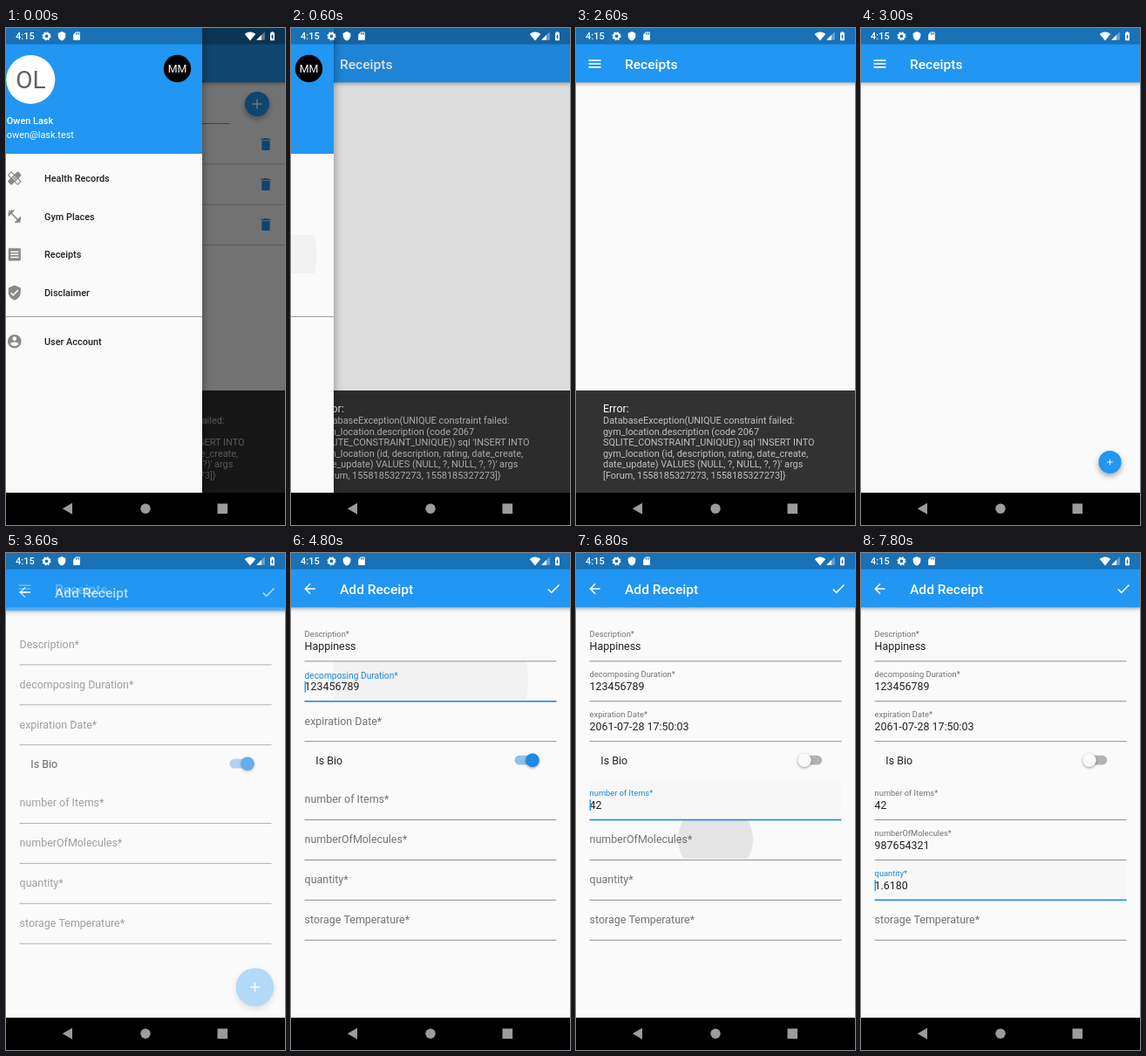
Animation, 320 px wide and 569 px high, one loop 8000 ms. Source, as an HTML page with a canvas:

```html
<!DOCTYPE html>
<html lang="en">
<head>
<meta charset="utf-8">
<title>Receipt form</title>
<style>
html, body { margin: 0; width: 100%; height: 100%; overflow: hidden; background: #000; }
canvas { display: block; width: 320px; height: 569px; }
</style>
</head>
<body>
<canvas id="stage"></canvas>
<script>
const W = 320, H = 569, LOOP = 8000, STEP = 200;
const BLUE = '#2196f3', PAPER = '#fafafa', INK = 'rgba(0,0,0,.87)', HINT = 'rgba(0,0,0,.54)';
const BODY = 12.45, SMALL = 10.9, DRAWER = 225;

const SHIELD = 'M12 1L3 5v6c0 5.55 3.84 10.74 9 12 5.16-1.26 9-6.45 9-12V5z';
const DOT = 'a1 1 0 0 1 0 2 1 1 0 0 1 0-2z';
const ICONS = {
  menu: 'M3 18h18v-2H3zM3 13h18v-2H3zM3 6v2h18V6z',
  back: 'M20 11H7.83l5.59-5.59L12 4l-8 8 8 8 1.41-1.41L7.83 13H20z',
  check: 'M9 16.17L4.83 12l-1.42 1.41L9 19 21 7l-1.41-1.41z',
  add: 'M19 13h-6v6h-2v-6H5v-2h6V5h2v6h6z',
  bin: 'M6 19c0 1.1.9 2 2 2h8c1.1 0 2-.9 2-2V7H6zM19 4h-3.5l-1-1h-5l-1 1H5v2h14z',
  healing: 'M17.73 12.02l3.98-3.98v-1.41l-4.34-4.34h-1.41l-3.98 3.98L8 2.29H6.6L2.25 6.63v1.41l3.98 3.98L2.25 16v1.41l4.34 4.34H8l3.98-3.98 3.98 3.98h1.42l4.34-4.34V16z' +
    'M7.29 10.96L3.66 7.34l3.63-3.63 3.62 3.62zM16.66 20.34l-3.63-3.62 3.63-3.63 3.62 3.62z' +
    'M12 9' + DOT + 'M10 11' + DOT + 'M14 11' + DOT + 'M12 13' + DOT,
  gym: 'M20.57 14.86L22 13.43 20.57 12 17 15.57 8.43 7 12 3.43 10.57 2 9.14 3.43 7.71 2 5.57 4.14 4.14 2.71 2.71 4.14l1.43 1.43L2 7.71l1.43 1.43L2 10.57 3.43 12 7 8.43 15.57 17 12 20.57 13.43 22l1.43-1.43L16.29 22l2.14-2.14 1.43 1.43 1.43-1.43-1.43-1.43L22 16.29z',
  receipt: 'M18 17H6v-2h12zM18 13H6v-2h12zM18 9H6V7h12zM3 22' + 'l1.5-1.5L'.replace('L', '') + 'l1.5 1.5' + 'l1.5-1.5l1.5 1.5'.repeat(5) +
    'V2' + 'l-1.5 1.5l-1.5-1.5'.repeat(6) + 'z',
  verified: SHIELD + 'M10 17l-4-4 1.41-1.41L10 14.17l6.59-6.59L18 9z',
  account: 'M12 2C6.48 2 2 6.48 2 12s4.48 10 10 10 10-4.48 10-10S17.52 2 12 2zm0 3c1.66 0 3 1.34 3 3s-1.34 3-3 3-3-1.34-3-3 1.34-3 3-3zm0 14.2c-2.5 0-4.71-1.28-6-3.22.03-1.99 4-3.08 6-3.08 1.99 0 5.97 1.09 6 3.08-1.29 1.94-3.5 3.22-6 3.22z',
  shield: SHIELD,
  card: 'M18 2h-8L4 8v12c0 1.1.9 2 2 2h12c1.1 0 2-.9 2-2V4c0-1.1-.9-2-2-2zM12 8h-2V4h2zM15 8h-2V4h2zM18 8h-2V4h2z',
  wifi: 'M12 3C7.3 3 3 4.9 0 7.4L12 22 24 7.4C21 4.9 16.7 3 12 3z',
  signal: 'M2 22h20V2z',
  signalPart: 'M2 22h12V10z',
  battery: 'M15.67 4H14V2h-4v2H8.33C7.6 4 7 4.6 7 5.33v15.33C7 21.4 7.6 22 8.33 22h7.33c.74 0 1.34-.6 1.34-1.33V5.33C17 4.6 16.4 4 15.67 4zM11 20v-5.5H9L13 7v5.5h2z'
};
for (const k in ICONS) ICONS[k] = new Path2D(ICONS[k]);

// y: centre of the resting label; at: time at which the field gets focus
const FIELDS = [
  { y: 100.3, label: 'Description*', value: 'Happiness', at: 4200 },
  { y: 146.2, label: 'decomposing Duration*', value: '123456789', at: 4800 },
  { y: 192.1, label: 'expiration Date*', value: '2061-07-28 17:50:03', at: 5400 },
  { y: 281.9, label: 'number of Items*', value: '42', at: 6600 },
  { y: 327.8, label: 'numberOfMolecules*', value: '987654321', at: 7000 },
  { y: 373.7, label: 'quantity*', value: '1.6180', at: 7600 },
  { y: 419.6, label: 'storage Temperature*', value: '', at: Infinity }
];
const MENU = [
  ['healing', 'Health Records', 172], ['gym', 'Gym Places', 215.8], ['receipt', 'Receipts', 259.3],
  ['verified', 'Disclaimer', 303], ['account', 'User Account', 358.7]
];
const ERROR = [
  'DatabaseException(UNIQUE constraint failed:',
  'gym_location.description (code 2067',
  "SQLITE_CONSTRAINT_UNIQUE)) sql 'INSERT INTO",
  'gym_location (id, description, rating, date_create,',
  "date_update) VALUES (NULL, ?, NULL, ?, ?)' args",
  '[Forum, 1558185327273, 1558185327273]}'
];

const dpr = window.devicePixelRatio || 1;
const stage = document.getElementById('stage'), layer = document.createElement('canvas');
const [main, sheet] = [stage, layer].map(c => {
  c.width = W * dpr;
  c.height = H * dpr;
  const ctx = c.getContext('2d');
  ctx.scale(dpr, dpr);
  return ctx;
});
let g = main;

const clamp = v => Math.max(0, Math.min(1, v));

function rect(x, y, w, h, color) {
  g.fillStyle = color;
  g.fillRect(x, y, w, h);
}
function disc(x, y, r, color) {
  g.fillStyle = color;
  g.beginPath();
  g.arc(x, y, r, 0, 7);
  g.fill();
}
function text(s, x, y, size, color, weight = 400, align = 'left') {
  g.font = `${weight} ${size}px Roboto, sans-serif`;
  g.textAlign = align;
  g.fillStyle = color;
  g.fillText(s, x, y);
}
function icon(name, x, y, color, size = 18.7) {
  g.save();
  g.translate(x - size / 2, y - size / 2);
  g.scale(size / 24, size / 24);
  g.fillStyle = color;
  g.fill(ICONS[name], 'evenodd');
  g.restore();
}
function shadow(blur, dy, alpha, draw) {
  g.save();
  g.shadowColor = `rgba(0,0,0,${alpha})`;
  g.shadowBlur = blur * dpr;
  g.shadowOffsetY = dy * dpr;
  draw();
  g.restore();
}
// age counts steps from the middle of the splash
function ripple(age, cx, cy, x, w, size = 1) {
  if (age < -1 || age > 1) return;
  g.save();
  g.beginPath();
  g.rect(x, cy - 22, w, 44);
  g.clip();
  disc(cx, cy, (112 + 51 * age - 18 * age * age) * size, `rgba(0,0,0,${0.032 * 2.8 ** -age})`);
  g.restore();
}

function page(title, nav) {
  rect(0, 0, W, 532, PAPER);
  shadow(5, 2, 0.35, () => rect(-10, -10, W + 20, 72.3, BLUE));
  icon(nav, 21.5, 41, '#fff');
  text(title, 56, 46.5, 15.56, '#fff', 500);
}
function fab(x, y, r) {
  shadow(6, 3, 0.35, () => disc(x, y, r, BLUE));
}

function gymPage() {
  page('Gym Places', 'menu');
  fab(288, 87, 14);
  icon('add', 288, 87, '#fff');
  rect(15, 109, 241, 0.9, 'rgba(0,0,0,.5)');
  for (let i = 0; i < 3; i++) {
    icon('bin', 298, 133 + 46 * i, BLUE);
    rect(0, 155.5 + 46.2 * i, W, 0.8, 'rgba(0,0,0,.25)');
  }
}

function receiptsPage(t) {
  page('Receipts', 'menu');
  const grow = clamp((t - 2880) / 200);
  if (!grow) return;
  fab(285.5, 497, 21.8 * grow);
  if (t === 3400) disc(285.5, 497, 20, 'rgba(255,255,255,.15)');
  icon('add', 285.5, 497, '#fff', 18.7 * grow);
}

function snackbar(t) {
  const y = 415 + 117 * clamp((t - 2670) / 200);
  if (y >= 532) return;
  rect(0, y, W, 117, '#323232');
  text('Error:', 31, y + 25.3, BODY, '#fff');
  ERROR.forEach((s, i) => text(s, 31, y + 38.3 + 12.5 * i, SMALL, 'rgba(255,255,255,.7)'));
}

function drawer(t) {
  const right = t < 600 ? DRAWER : t < 800 ? 49 : 0;
  if (!right) return;
  rect(0, 0, W, 532, `rgba(0,0,0,${0.54 * right / DRAWER})`);
  g.save();
  g.translate(right - DRAWER, 0);
  shadow(10, 3, 0.4, () => rect(0, 0, DRAWER, 532, PAPER));
  rect(0, 0, DRAWER, 144, BLUE);
  disc(28.3, 59, 28, '#fff');
  text('OL', 28.5, 69.2, 28, '#616161', 400, 'center');
  disc(196.5, 46.5, 15.7, '#000');
  text('MM', 196.5, 51, BODY, '#fff', 400, 'center');
  text('Owen Lask', 0.8, 110.3, SMALL, '#fff', 500);
  text('owen@lask.test', 0.8, 126, SMALL, '#fff');
  for (const [name, label, y] of MENU) {
    icon(name, 9.8, y, 'rgba(0,0,0,.45)');
    text(label, 44, y + 3.9, SMALL, INK, 500);
  }
  rect(0, 330, DRAWER, 0.9, 'rgba(0,0,0,.4)');
  ripple((t - 600) / STEP, 112.5, 259, 0, DRAWER, 0.83);
  g.restore();
}

function field(f, t, active) {
  const p = clamp((t - f.at + 144) / 200), filled = t >= f.at;
  const up = filled ? p : 0;
  ripple((t - f.at) / STEP, 160, f.y, 15.5, 289);
  text(f.label, 15.6, f.y + 4.4 - 8.5 * up, BODY * (1 - 0.25 * up), active ? '#1e88d8' : HINT);
  if (filled) text(f.value, 15.6, f.y + 11, BODY, INK);
  if (active) rect(15.6, f.y + 0.6, 1.5, 12.6, BLUE);
  const line = active ? 1.6 : 0.9;
  rect(15.5, f.y + 23.6 - line / 2, 289, line, active ? '#1e88e5' : 'rgba(0,0,0,.48)');
}

function toggle(t) {
  const off = clamp((t - 5740) / 400), y = 237.2;
  ripple((t - 6000) / STEP, 160, y, 0, W);
  text('Is Bio', 28.3, y + 4.4, BODY, INK);
  const mix = (a, b) => Math.round(a + (b - a) * off);
  g.fillStyle = `rgb(${mix(140, 178)},${mix(193, 178)},${mix(240, 178)})`;
  g.beginPath();
  g.roundRect(256.5, y - 5.4, 25.7, 10.8, 5.4);
  g.fill();
  shadow(3, 1, 0.4, () => disc(277 - 15 * off, y, 7.8, `rgb(${mix(30, 250)},${mix(136, 250)},${mix(229, 250)})`));
}

function formPage(t) {
  page('Add Receipt', 'back');
  icon('check', 301, 41, '#fff');
  const focused = FIELDS.filter(f => f.at <= t).pop();
  FIELDS.forEach(f => field(f, t, f === focused));
  toggle(t);
}

function gear(x, y) {
  g.strokeStyle = '#fff';
  for (const [r, width, dash] of [[3, 2.2, []], [4.3, 1.5, [4.3 * Math.PI / 8]]]) {
    g.lineWidth = width;
    g.setLineDash(dash);
    g.beginPath();
    g.arc(x, y, r, 0, 2 * Math.PI);
    g.stroke();
  }
  g.setLineDash([]);
}

function systemBars() {
  rect(0, 0, W, 18.6, 'rgba(0,0,0,.25)');
  text('4:15', 11, 13.2, 11, '#fff', 500);
  gear(46.5, 9.3);
  icon('shield', 64, 9.3, '#fff', 11.5);
  icon('card', 81, 9.3, '#fff', 11.5);
  icon('wifi', 280, 9.3, '#fff', 12.5);
  icon('signal', 292, 9, 'rgba(255,255,255,.35)', 11.5);
  icon('signalPart', 292, 9, '#fff', 11.5);
  icon('battery', 305.5, 9.3, '#fff', 12);

  const grey = '#9c9c9c';
  rect(0, 532, W, 37, '#000');
  g.fillStyle = grey;
  g.beginPath();
  g.moveTo(64.8, 550.3);
  g.lineTo(76, 543.8);
  g.lineTo(76, 556.8);
  g.fill();
  disc(160, 550.3, 5.7, grey);
  rect(242.5, 544.5, 11.6, 11.6, grey);
}

function draw(now) {
  const t = Math.floor(now % LOOP / STEP) * STEP;
  g = main;
  if (t < 3800) {
    if (t < 600) gymPage();
    else receiptsPage(t);
    snackbar(t);
    drawer(t);
    if (t === 3600) {
      g = sheet;
      formPage(t);
      g = main;
      g.globalAlpha = 0.67;
      g.drawImage(layer, 0, 4, W, H);
      g.globalAlpha = 1;
    }
  } else formPage(t);
  systemBars();
}

function frame() {
  draw(performance.now());
  requestAnimationFrame(frame);
}
frame();
</script>
</body>
</html>
```
